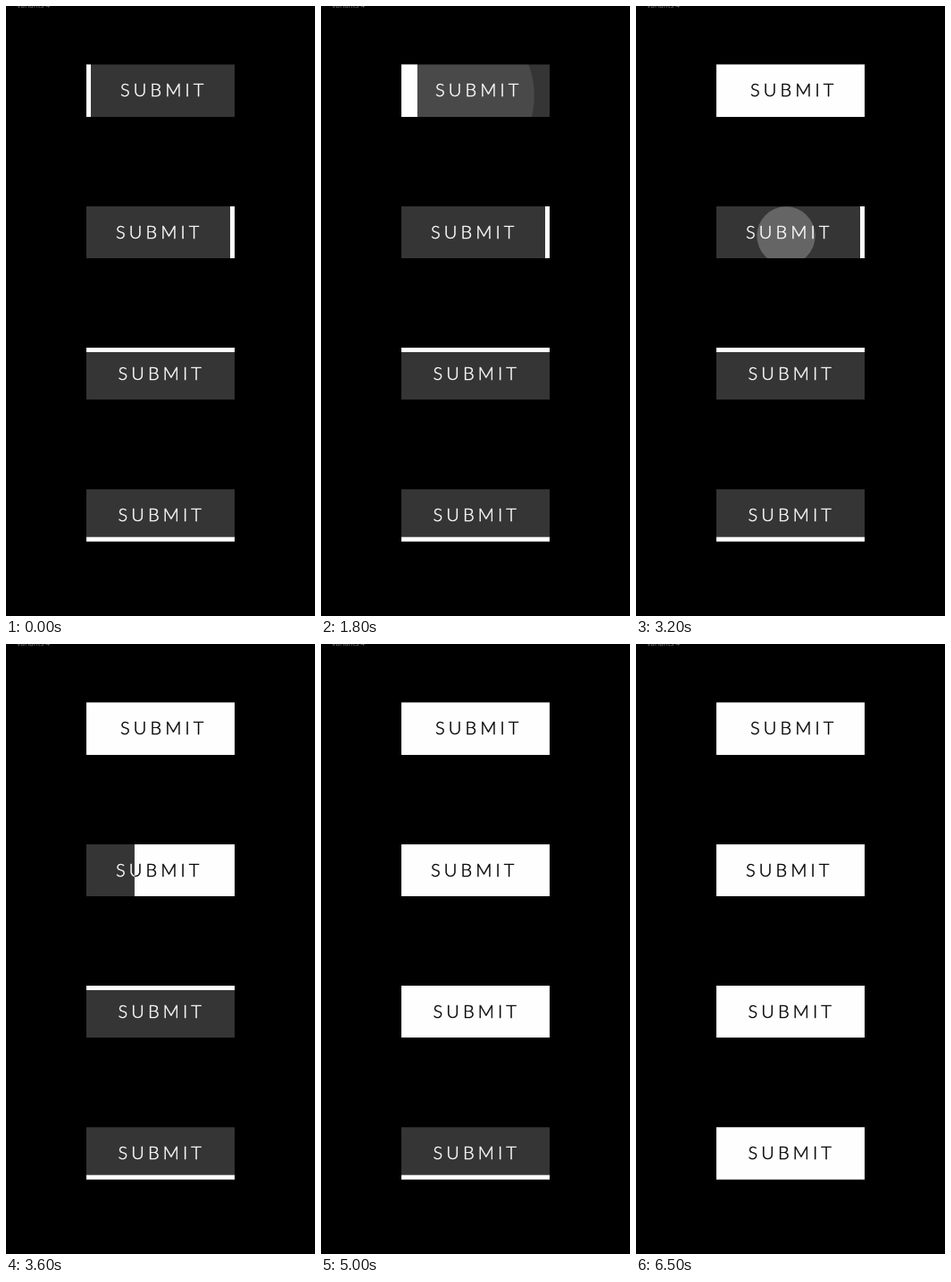
Recreate the animation shown at these times as an HTML page. Size 346 px wide and 682 px high, loop 7.5 s.

```html
<!DOCTYPE html>
<html lang="en">
<head>
<meta charset="utf-8">
<title>Submit buttons</title>
<style>
  html, body { margin: 0; width: 100%; height: 100%; overflow: hidden; background: #000; }
  svg { display: block; width: 100%; height: 100%; }
  .label { font: 300 20px Lato, sans-serif; letter-spacing: 4.1px; stroke-width: .45px; }
  .note { font: 8px "Open Sans", sans-serif; fill: #777; }
</style>
</head>
<body>
<svg id="stage" viewBox="0 0 346 682">
  <text class="note" x="12" y="2">Variants 4</text>
</svg>
<script>
const LOOP = 7500, STEP = 100;
const X = 90, W = 166, BAR = 5;
const FILL_TIME = 500, RIPPLE_TIME = 450, RIPPLE_R = 140;

// press and fill are start times in ms; cx, cy is the pressed point
const buttons = [
  { side: 'left',   y: 65.4,  h: 58.6, textX: 128, textY: 101, press: 1495, fill: 1701, cx: 144, cy: 100 },
  { side: 'right',  y: 224,   h: 58,   textX: 123, textY: 260, press: 3095, fill: 3301, cx: 168, cy: 257 },
  { side: 'top',    y: 382,   h: 58,   textX: 125.5, textY: 418, press: 4400, fill: 4512, cx: 190.5, cy: 416 },
  { side: 'bottom', y: 540.3, h: 58.4, textX: 125.5, textY: 576, press: 5795, fill: 6001, cx: 172, cy: 573 }
];

const stage = document.getElementById('stage');

function add(parent, tag, attrs) {
  const el = document.createElementNS('http://www.w3.org/2000/svg', tag);
  set(el, attrs);
  parent.appendChild(el);
  return el;
}

function set(el, attrs) {
  for (const key in attrs) el.setAttribute(key, attrs[key]);
}

function label(parent, b, color, clip) {
  const g = add(parent, 'g', clip ? { 'clip-path': `url(#${clip})` } : {});
  const attrs = { class: 'label', x: b.textX, y: b.textY, fill: color, stroke: color };
  add(g, 'text', attrs).textContent = 'SUBMIT';
}

function build(b) {
  const box = { x: X, y: b.y, width: W, height: b.h };
  const boxId = 'box-' + b.side, barId = 'bar-' + b.side;
  add(add(stage, 'clipPath', { id: boxId }), 'rect', box);
  b.mask = add(add(stage, 'clipPath', { id: barId }), 'rect', {});
  add(stage, 'rect', { ...box, fill: '#353535' });
  const g = add(stage, 'g', { 'clip-path': `url(#${boxId})` });
  b.ripple = add(g, 'circle', { cx: b.cx, cy: b.cy, fill: '#fff' });
  label(stage, b, '#fff');
  b.bar = add(stage, 'rect', { fill: '#fefefe' });
  label(stage, b, '#000', barId);
}

const clamp = v => Math.min(1, Math.max(0, v));

// cubic-bezier(.42, 0, .58, 1), solved by bisection
function easeInOut(x) {
  if (x <= 0 || x >= 1) return clamp(x);
  let lo = 0, hi = 1, u = 0.5;
  for (let i = 0; i < 20; i++) {
    u = (lo + hi) / 2;
    const bx = 1.26 * u * (1 - u) ** 2 + 1.74 * u * u * (1 - u) + u ** 3;
    if (bx < x) lo = u; else hi = u;
  }
  return u * u * (3 - 2 * u);
}

function barBox({ side, y, h }, k) {
  const across = side === 'left' || side === 'right';
  const width = across ? BAR + (W - BAR) * k : W;
  const height = across ? h : BAR + (h - BAR) * k;
  return {
    x: side === 'right' ? X + W - width : X,
    y: side === 'bottom' ? y + h - height : y,
    width, height
  };
}

function draw(t) {
  for (const b of buttons) {
    const box = barBox(b, easeInOut((t - b.fill) / FILL_TIME));
    set(b.bar, box);
    set(b.mask, box);
    const p = clamp((t - b.press) / RIPPLE_TIME);
    set(b.ripple, { r: RIPPLE_R * p, opacity: 0.31 * (1 - p) });
  }
}

function tick() {
  const t = performance.now() % LOOP;
  draw(Math.floor(t / STEP) * STEP);
  requestAnimationFrame(tick);
}

buttons.forEach(build);
tick();
</script>
</body>
</html>
```
